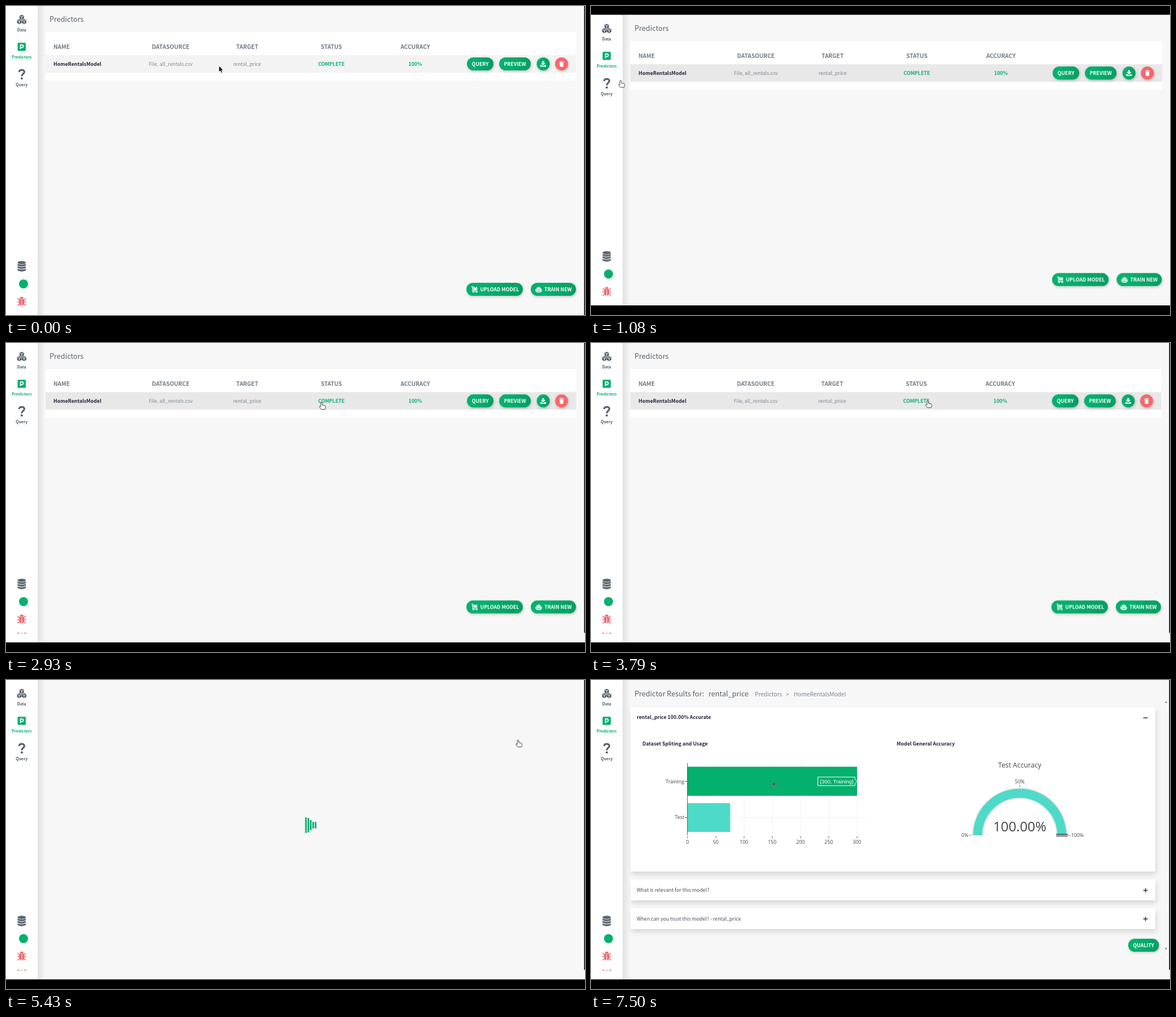
These frames come from a looping animation (1025x547 px, 8 s). An HTML page:

```html
<!DOCTYPE html>
<html lang="en">
<head>
<meta charset="utf-8">
<title>Predictors</title>
<style>
html, body { margin: 0; width: 100%; height: 100%; overflow: hidden; background: #f7f7f7; }
svg { display: block; width: 100vw; height: 100vh; }
text { font-family: "Noto Sans CJK JP", "Noto Sans CJK SC", "Noto Sans CJK", "Open Sans", sans-serif; font-size: 8.8px; fill: #7b8592; }
.b { font-weight: 700; }
.head { font-size: 10.1px; font-weight: 700; fill: #6e7986; }
.title { font-size: 12.65px; fill: #5a626c; }
.crumb { font-size: 10.1px; fill: #7b8592; }
.dark { fill: #23243a; }
.soft { fill: #4b4e5b; }
.ok { fill: #04b06d; font-weight: 700; }
.btn { fill: #fff; font-weight: 700; }
.side { font-size: 7px; font-weight: 700; fill: #4f5a66; }
.plot text { font-family: "Open Sans", sans-serif; font-size: 8.75px; fill: #444; }
.plot .tip { font-family: "Liberation Sans", Arial, sans-serif; font-size: 9.3px; fill: #fff; }
.mid { text-anchor: middle; }
.end { text-anchor: end; }
.lift { filter: drop-shadow(1px 2px 2px rgba(0,0,0,.2)); }
.card { fill: #fff; filter: drop-shadow(2px 5px 5px rgba(0,0,0,.13)); }
.bar { fill: #07ad6c; transform-box: fill-box; transform-origin: center; }
</style>
</head>
<body>
<svg viewBox="0 0 1025 547" preserveAspectRatio="none">
  <defs>
    <linearGradient id="green"><stop offset=".3" stop-color="#04b06d"/><stop offset="1" stop-color="#049e62"/></linearGradient>
    <linearGradient id="edge"><stop stop-color="#000" stop-opacity=".09"/><stop offset="1" stop-color="#000" stop-opacity="0"/></linearGradient>
  </defs>
  <rect width="1025" height="547" fill="#f7f7f7"/>
  <g id="table">
    <g id="list"></g>
    <g id="actions"></g>
  </g>
  <g id="loader"></g>
  <g id="results"></g>
  <rect width="56" height="547" fill="#fff"/>
  <rect x="56" width="13" height="547" fill="url(#edge)"/>
  <g id="menu"></g>
  <g id="tools"></g>
  <path id="residue" d="M20 513.6h4M27 513.6h2M32 513.6h4" stroke="#f0666b" stroke-width="1.2"/>
  <rect id="topBar" width="1025" height="15.5"/>
  <rect id="bottomBar" y="530" width="1025" height="17"/>
  <rect id="rightFull" x="1023.5" width="1.5" height="547"/>
  <rect id="rightShort" x="1023.5" width="1.5" height="513"/>
  <g id="cursor">
    <path id="arrow" d="M0 0V10.8L2.5 8.6L4.3 12.6L6.1 11.8L4.3 8H7.6Z" stroke="#fff" stroke-width=".7"/>
    <path id="hand" d="M-1.3 1Q0 -.9 1.3 1V4.8L5.8 5.8Q7.6 6.6 7.2 8.8L5.9 12.6H-.4L-3.6 8.6Q-4.2 6.8 -2.5 7.1L-1.3 8.1Z" fill="#fff" stroke="#30343a" stroke-width=".95" stroke-linejoin="round"/>
    <g id="cross"><path d="M-5 0H5M0 -5V5" stroke="#9ab8ab" stroke-width="2.6"/><path d="M-4.5 0H4.5M0 -4.5V4.5" stroke="#111" stroke-width="1.1"/></g>
  </g>
</svg>
<script>
const LOOP = 8000;
const $ = id => document.getElementById(id);
const text = (x, y, str, cls = '') => `<text x="${x}" y="${y}" class="${cls}">${str}</text>`;
const path = (d, attrs) => `<path d="${d}" ${attrs}/>`;
const rect = (x, y, w, h, attrs) => `<rect x="${x}" y="${y}" width="${w}" height="${h}" ${attrs}/>`;
const pill = (x, y, w, label, textX = x + w / 2, cls = 'mid') =>
  rect(x, y, w, 23, 'rx="11.5" fill="url(#green)" class="lift"') + text(textX, y + 14.8, label, 'btn ' + cls);
const disc = (x, fill) => `<circle cx="${x}" cy="102.5" r="11.5" fill="${fill}" class="lift"/>`;
const white = 'fill="#fff"';

// Predictor list
$('list').innerHTML =
  text(77, 28, 'Predictors', 'title') +
  rect(70, 46, 939.5, 86, white) +
  rect(70, 87, 939.5, 31, 'id="row"') +
  text(84, 76, 'NAME', 'head') +
  [[291.5, 'DATASOURCE'], [427, 'TARGET'], [576, 'STATUS'], [724.5, 'ACCURACY']]
    .map(([x, label]) => text(x, 76, label, 'head mid')).join('') +
  text(84, 106, 'HomeRentalsModel', 'b dark') +
  text(291.5, 106, 'File, all_rentals.csv', 'mid') +
  text(427, 106, 'rental_price', 'mid') +
  text(576, 106, 'COMPLETE', 'ok mid') +
  text(724.5, 106, '100%', 'ok mid') +
  pill(816, 91, 47, 'QUERY') + pill(873, 91, 56, 'PREVIEW') +
  rect(873, 91, 56, 23, 'id="press" rx="11.5" fill="#003820"') +
  disc(951, 'url(#green)') +
  path('M949.4 97.5h3.2v3.4h2.6l-4.2 4l-4.2 -4h2.6zM946 104.6h2.6l2.4 2l2.4 -2h2.6v3h-10z', white) +
  disc(983.5, '#f7666c') +
  path('M979.6 98.2h2.4l.6 -.9h1.8l.6 .9h2.4v1.2h-7.8zM980.1 100.1h6.8l-.5 7.6h-5.8z', white);

$('actions').innerHTML =
  pill(815, 490, 100, 'UPLOAD MODEL', 839.5, '') +
  path('M824 497h2.2v7.5h8.5', 'fill="none" stroke="#fff" stroke-width="1.3"') +
  path('M827.6 497.5h2.6v2.3h1.4v-2.3h2.6v5.3h-6.6z', white) +
  `<circle cx="827.5" cy="506" r="1.5" fill="#fff"/><circle cx="833" cy="506" r="1.5" fill="#fff"/>` +
  pill(929, 490, 80, 'TRAIN NEW', 953, '') +
  path('M942.4 496.5h1.2v2h3.1v8.5h-7.4v-8.5h3.1zM937.2 501h1.4v4.4h-1.4zM947.4 501h1.4v4.4h-1.4z', white) +
  path('M941 501.5h1.4M943.8 501.5h1.4M940.8 504.6h4.5', 'stroke="#04a868" stroke-width="1.4"');

// Sidebar
const cube = (x, y) =>
  path(`M${x} ${y - 4.5}l4 1.8v5l-4 2.1l-4 -2.1v-5z`, 'fill="#59636e"') +
  path(`M${x - 3} ${y - 2.2}l3 1.3l3 -1.3M${x} ${y - .9}v4`, 'stroke="#fff" stroke-width=".9" fill="none"');
$('menu').innerHTML =
  cube(27.8, 20) + cube(23.6, 27.8) + cube(32, 27.8) +
  text(27.8, 44.5, 'Data', 'side mid') +
  rect(20.5, 65, 14.5, 14.5, 'rx="1.6" fill="#04b06d"') +
  path('M25.6 76.3v-7.4h2.6a2.2 2.2 0 0 1 0 4.7h-2.6', 'fill="none" stroke="#fff" stroke-width="1.7"') +
  `<text x="27.8" y="93" class="side mid" style="fill:#04b06d">Predictors</text>` +
  path('M23.2 117C24 111.6 33 112.2 32.4 117C32 120.3 27.9 120 27.9 124.6', 'fill="none" stroke="#59636e" stroke-width="3.2"') +
  '<circle cx="27.9" cy="128.2" r="2" fill="#59636e"/>' +
  text(27.8, 141.5, 'Query', 'side mid');

const layer = y => path(`M20.4 ${y}q7.4 3.2 14.8 0v3q-7.4 4 -14.8 0z`, 'fill="#59636e"');
$('tools').innerHTML =
  '<ellipse cx="27.8" cy="454.3" rx="7.4" ry="2.8" fill="#59636e"/>' +
  layer(456.2) + layer(460.6) + layer(465) +
  '<circle cx="31" cy="492" r="8" fill="#04b06d"/>' +
  path('M24.3 518.4a3.5 3.5 0 0 1 7 0zM23.4 519.2h8.8v6.8q-.6 4 -3.8 4.4v-9h-1.2v9q-3.2 -.4 -3.8 -4.4z', 'fill="#f0666b"') +
  path('M20.6 517.6l3.4 3M35 517.6l-3.4 3M20 523.8h4M35.6 523.8h-4M20.6 530.4l3.8 -3.4M35 530.4l-3.8 -3.4', 'stroke="#f0666b" stroke-width="1.6"');

// Loader
$('loader').innerHTML = [0, 1, 2, 3, 4]
  .map(i => rect(529.6 + i * 4.25, 243, 2.8, 28, 'rx="1" class="bar"')).join('');

// Results
const ticks = [0, 50, 100, 150, 200, 250, 300];
const plus = y => path(`M977.7 ${y}h7.8M981.6 ${y - 3.9}v7.8`, 'stroke="#40434f" stroke-width="1.7"');
const arc = r => `M${759 - r} 275A${r} ${r} 0 0 1 ${759 + r} 275`;
$('results').innerHTML =
  text(77, 29, 'Predictor Results for:', 'title') + text(208, 29, 'rental_price', 'title') +
  text(290, 28.5, 'Predictors', 'crumb') + text(345, 28.5, '&gt;', 'crumb') + text(359, 28.5, 'HomeRentalsModel', 'crumb') +
  rect(70, 48, 929, 291, 'class="card"') + rect(70, 353, 929, 37, 'class="card"') + rect(70, 404, 929, 37, 'class="card"') +
  text(81, 69, 'rental_price 100.00% Accurate', 'b dark') +
  path('M977.7 67h7.8', 'stroke="#40434f" stroke-width="1.7"') + plus(372.3) + plus(422.8) +
  text(91, 116, 'Dataset Spliting and Usage', 'b dark') + text(541, 116, 'Model General Accuracy', 'b dark') +
  text(81, 375, 'What is relevant for this model?', 'soft') +
  text(81, 425.5, 'When can you trust this model? - rental_price', 'soft') +
  pill(951, 458, 54.5, 'QUALITY') +
  path('M1015.5 40.5l2.5 -3l2.5 3zM1015.5 474.5l2.5 3l2.5 -3z', 'fill="#8a8a8a"') +
  '<g class="plot">' +
  path(ticks.slice(1).map(v => `M${171 + v} 147V275`).join('') + 'M171 179.5H487M171 243.5H487', 'stroke="#eee" stroke-width=".8"') +
  rect(171, 153.5, 300, 51.5, 'fill="#04b06d"') + rect(171, 218, 75.5, 51, 'fill="#4edac9"') +
  path('M170.7 147V275M166 179.5h4M166 243.5h4' + ticks.map(v => `M${171 + v} 276.5v3.5`).join(''), 'stroke="#444" stroke-width=".9"') +
  ticks.map(v => text(170.7 + v, 289.5, v, 'mid')).join('') +
  text(165, 182.5, 'Training', 'end') + text(165, 246.3, 'Test', 'end') +
  '<g id="tip">' + path('M471 179.5L467.3 176V171.8H401.5V187H467.3V183Z', 'fill="#04b06d" stroke="#fff" stroke-width="1"') +
  text(405, 183, '(300, Training)', 'tip') + '</g>' +
  '<text x="759" y="154.5" class="mid" style="font-size:12.2px">Test Accuracy</text>' +
  path(arc(74.5), 'fill="none" stroke="#e2e4e4" stroke-width="19.5"') +
  path(arc(74.5), 'fill="none" stroke="#4edac9" stroke-width="16"') +
  path('M823.5 273H844M823.5 276.3H844', 'stroke="#444" stroke-width="1.3"') +
  path('M823.5 274.7H844', 'stroke="#9aa" stroke-width="1.6"') +
  path('M759 186v3.5M670 274.8h3.5M845 274.8h3.5', 'stroke="#444" stroke-width=".8"') +
  text(759, 183, '50%', 'mid') + text(668, 278, '0%', 'end') + text(850, 278, '100%') +
  '<text x="759" y="268" class="mid" style="font-size:23.8px">100.00%</text></g>';

// Motion: each track is a list of [ms, value]
const start = document.timeline.currentTime || 0;
function run(el, frames, timing) {
  el.animate(frames, { iterations: Infinity, ...timing }).startTime = start;
}
function track(id, prop, steps, easing = 'linear') {
  const all = [...steps, [LOOP, steps[steps.length - 1][1]]];
  run($(id), all.map(([ms, value]) => ({ offset: ms / LOOP, [prop]: value, easing })), { duration: LOOP });
}
const hold = (id, prop, steps) => track(id, prop, steps, 'steps(1)');
const show = (id, ...spans) => hold(id, 'opacity',
  [...(spans[0][0] ? [[0, 0]] : []), ...spans.flatMap(([from, to]) => to < LOOP ? [[from, 1], [to, 0]] : [[from, 1]])]);

const BOXED = 140, DOCKED = 2670, LOADING = 5140, READY = 5510;
const shift = (x, y, s = 1) => `translate(${x}px, ${y}px) scale(${s})`;
hold('list', 'transform', [[0, shift(0, 0)], [BOXED, shift(0, 16, 1.0015)], [DOCKED, shift(0, 0)]]);
hold('actions', 'transform', [[0, shift(0, 0)], [BOXED, shift(0, -18, 1.0015)], [DOCKED, shift(0, -34.3)]]);
hold('menu', 'transform', [[0, shift(0, 0)], [BOXED, shift(0, 16)], [DOCKED, shift(0, 0)]]);
hold('tools', 'transform', [[0, shift(0, 0)], [BOXED, shift(0, -17.5)], [DOCKED, shift(0, -34.2)]]);
show('topBar', [BOXED, DOCKED]);
show('bottomBar', [BOXED, LOOP]);
show('rightFull', [0, BOXED]);
show('rightShort', [DOCKED, LOOP]);
show('residue', [DOCKED, LOOP]);
show('table', [0, LOADING]);
show('loader', [LOADING, READY]);
show('results', [READY, LOOP]);
show('tip', [6800, LOOP]);

const rest = '#f3f3f3', hover = '#e8e8e8';
track('row', 'fill', [[0, rest], [140, rest], [200, hover], [1080, hover], [1390, rest], [2060, rest], [2500, hover]]);
track('press', 'opacity', [[0, 0], [4150, 0], [4280, .09]]);

track('cursor', 'transform', [
  [0, 377, 106], [140, 377, 106], [200, 377, 112], [720, 377, 112], [880, 95, 119], [1040, 70, 129], [1080, 52.5, 131.5],
  [1390, 28, 131], [1870, 28, 131], [2050, 380, 141], [2130, 410, 143], [2520, 500, 119], [2669, 500, 119],
  [2670, 500, 104], [2930, 558.5, 105], [3500, 558.5, 105], [3790, 595.5, 102], [3920, 670, 99], [4100, 830, 102],
  [4280, 890, 105.5], [4370, 890, 105.5], [4560, 906.5, 106], [6260, 906.5, 106], [6400, 830, 116],
  [6700, 390, 175], [6880, 324, 184]
].map(([ms, x, y]) => [ms, shift(x, y)]));
show('arrow', [0, 140], [1960, 2300], [6120, 6720]);
show('hand', [140, 1960], [2300, 6120]);
show('cross', [6720, LOOP]);

document.querySelectorAll('.bar').forEach((bar, i) => run(bar,
  [1, .4, 1].map(s => ({ transform: `scaleY(${s})`, easing: 'cubic-bezier(.2,.68,.18,1.08)' })),
  { duration: 1000, iterationStart: 1.325 - i * .1 }));
</script>
</body>
</html>
```
